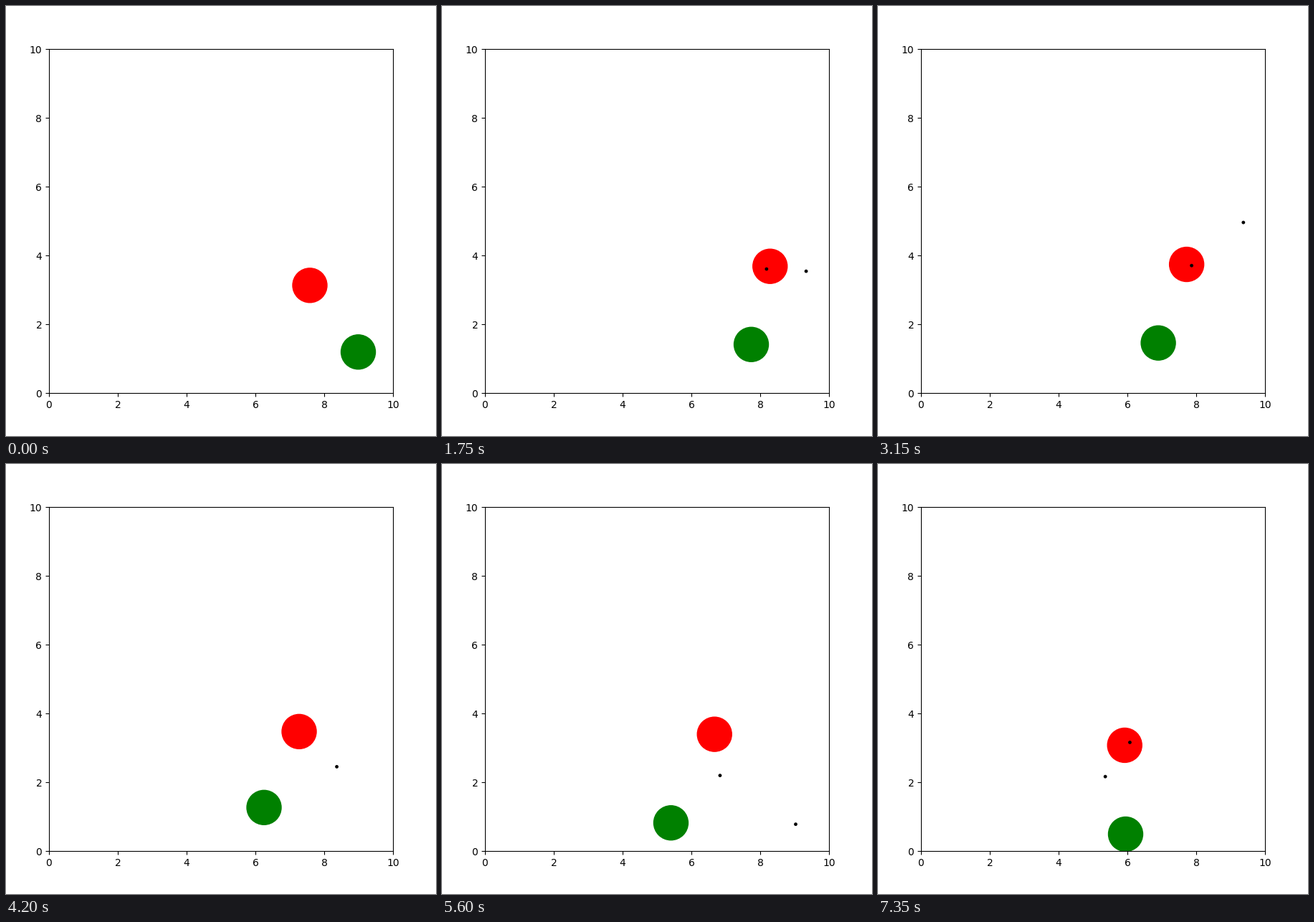
Animation, 600 px wide and 600 px high, one loop 7.7 s. Source, as a matplotlib script:

```python
import numpy as np
import matplotlib.pyplot as plt
from matplotlib.animation import FuncAnimation
from matplotlib.patches import Circle

FRAMES, INTERVAL = 22, 350
SIZE = 10
BALL_RADIUS, SHOT_RADIUS = 0.5, 0.05
SHOT_SPEED, SHOT_EVERY = 0.45, 4
SHOT_ANGLES = np.radians([13.2, 48.75, -68.3, -109, -136.9, 0])


def travel(start, legs):
    """Path from legs of (steps, velocity, acceleration)."""
    path = [np.array(start)]
    for steps, velocity, accel in legs:
        for k in range(steps):
            path.append(path[-1] + np.array(velocity) + k * np.array(accel))
    return np.array(path)


red_path = travel((7.583, 3.129), [
    (4, (0.1504, 0.1375), (0, -0.0125)),
    (1, (0.102, 0.079), (0, 0)),
    (4, (-0.1375, -0.0063), (-0.0025, 0.0135)),
    (3, (-0.15, -0.089), (0, 0)),
    (9, (-0.15, -0.005), (0, -0.0098)),
])
green_path = travel((8.990, 1.192), [
    (1, (-0.248, 0.14), (0, 0)),
    (4, (-0.2505, -0.0073), (0, 0.018)),
    (4, (-0.2417, 0.083), (0.0208, -0.048)),
    (4, (-0.206, -0.0854), (-0.0098, 0.0219)),
    (4, (-0.22, -0.1423), (0.0167, 0)),
    (1, (-0.0375, -0.1354), (0, 0)),
    (3, (0.25, -0.0354), (0, 0.0188)),
])

fig = plt.figure(figsize=(6, 6), dpi=100)
ax = fig.add_axes([0.1, 0.1, 0.8, 0.8])
ax.set(xlim=(0, SIZE), ylim=(0, SIZE))

red = ax.add_patch(Circle(red_path[0], BALL_RADIUS, color="red"))
green = ax.add_patch(Circle(green_path[0], BALL_RADIUS, color="green"))
shots = [ax.add_patch(Circle((0, 0), SHOT_RADIUS, fc="black", lw=0, zorder=2))
         for _ in SHOT_ANGLES]


def update(i):
    red.center = red_path[i]
    green.center = green_path[i]
    for k, (shot, angle) in enumerate(zip(shots, SHOT_ANGLES)):
        # A shot leaves from where red stood one step before it appears.
        fired = k * SHOT_EVERY
        age = i - fired - 1
        heading = np.array([np.cos(angle), np.sin(angle)])
        pos = red_path[fired] + age * SHOT_SPEED * heading
        inside = np.all((pos >= 0) & (pos <= SIZE))
        hit = np.hypot(*(pos - green_path[i])) < BALL_RADIUS
        shot.center = pos
        shot.set_visible(bool(age >= 0 and inside and not hit))
    return red, green, *shots


anim = FuncAnimation(fig, update, frames=FRAMES, interval=INTERVAL,
                     repeat=True, repeat_delay=0)
plt.show()
```
